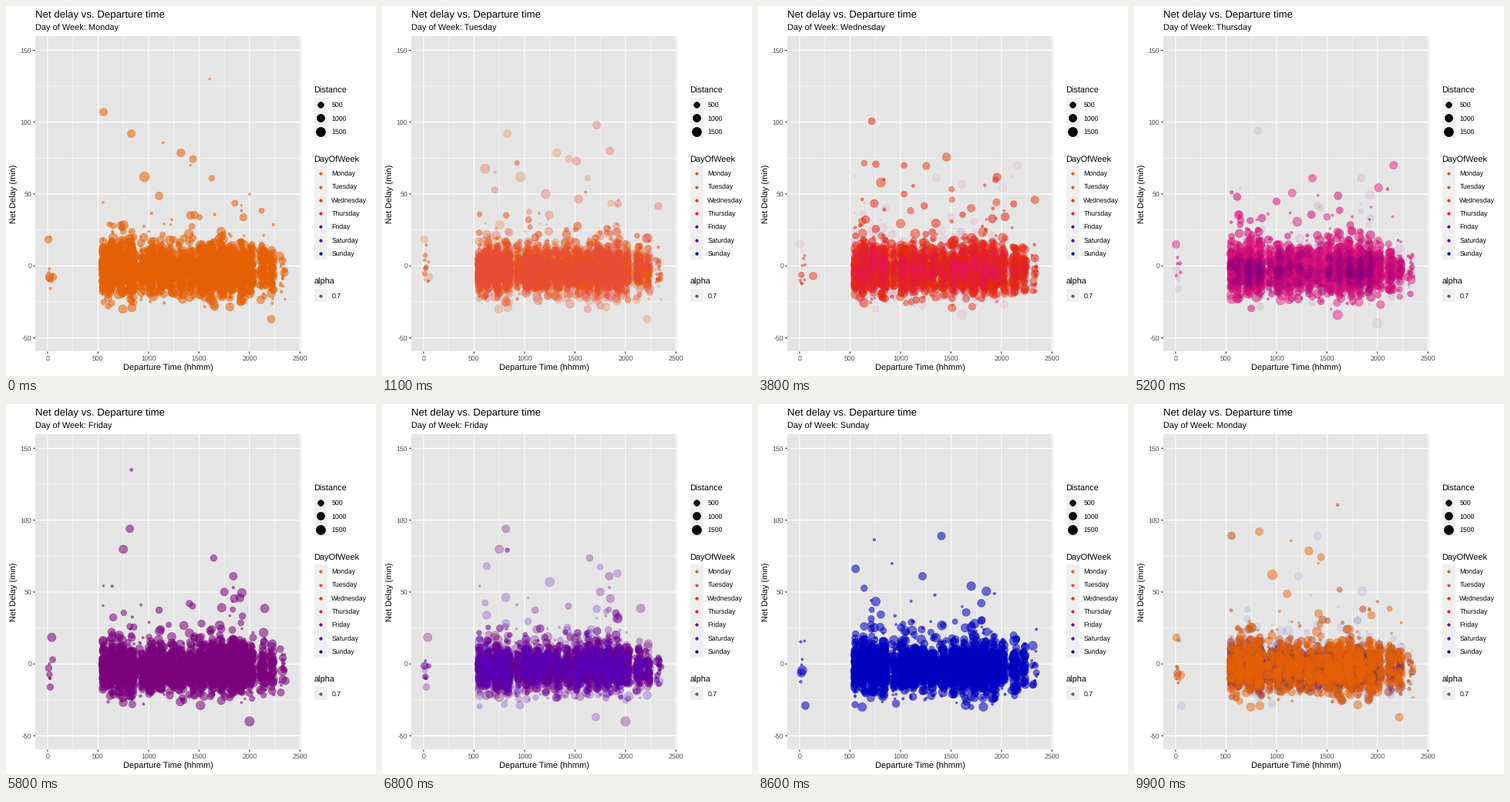
Recreate the animation shown at these times as a matplotlib script. Size 480 px wide and 480 px high, loop 10000 ms.

```python
import matplotlib.pyplot as plt
import numpy as np
from matplotlib.animation import FuncAnimation
from matplotlib.colors import to_rgb
from matplotlib.patches import Rectangle

plt.rcParams["font.family"] = "Liberation Sans"
plt.rcParams["text.hinting"] = "none"

DAYS = ["Monday", "Tuesday", "Wednesday", "Thursday", "Friday", "Saturday", "Sunday"]
HUES = ["#e66005", "#ea4c3a", "#e62d0a", "#e3147a", "#7a007c", "#5800bc", "#0000c0"]
RGB = np.array([to_rgb(c) for c in HUES])
LAST_HOLD = np.array([7, 22, 37, 51, 65, 79, 93])  # last still frame of each day
STEPS = 7
ALPHA = 0.55
EDGE = 0.6
FLIGHTS = 4800
BIG, TINY = 5.1, 1.4

rng = np.random.default_rng(11)


def px(t):
    return 53.9 + 0.131 * np.asarray(t)


def py(v):
    return 337.2 - 1.865 * np.asarray(v)


# --- flights ----------------------------------------------------------------
def departures(n):
    """Clock times as hhmm, from 5:50 to 23:59, plus a few after midnight."""
    hours = np.arange(5, 24)
    load = 6 + 2 * np.cos((hours - 18) / 5 * np.pi)
    load[hours == 5] = 3
    load[hours == 9] = 2.5
    load[hours > 19] = [2.6, 3.2, 1.6, 0.8]
    hour = rng.choice(hours, n, p=load / load.sum())
    first = np.select([hour == 5, hour == 9], [50, 10], 0)
    last = np.select([hour == 20, hour == 22], [40, 45], 60)
    minute = first + rng.random(n) * (last - first)
    t = hour * 100 + minute // 5 * 5
    t[:14] = rng.uniform(0, 60, 14)
    return t


def delays(shape):
    late = rng.random(shape) < 0.03
    tail = np.minimum(10 + rng.exponential(18, shape), 75)
    return rng.normal(-3, 8.4, shape).clip(-30, 24) + late * tail


def radii(t):
    shape = (7, len(t))
    small = np.where((t < 100) | (t > 2290), 0.75, np.where(t // 100 == 9, 0.6, 0.33))
    return np.where(rng.random(shape) < small,
                    rng.uniform(1.3, 1.9, shape), rng.uniform(3.5, 6.1, shape))


times = departures(FLIGHTS)
delay = delays((7, FLIGHTS))
size = radii(times)
flying = rng.random((7, FLIGHTS)) < 0.62

# the most striking flights of each day: time, delay, radius
STRIKING = [
    [(555, 107, BIG), (830, 92, BIG), (1605, 130, TINY), (960, 62, 6.5), (2215, -37, BIG)],
    [(925, 131, TINY), (1715, 98, BIG), (1845, 80, BIG), (1210, 50, 6)],
    [(715, 119, BIG), (805, 58, 6), (2330, 46, BIG), (135, -7, BIG)],
    [(5, 15, BIG), (2160, 70, BIG), (1355, 61, BIG), (1605, -34, 6.2)],
    [(815, 94, BIG), (830, 135, 2), (1840, 61, BIG), (2000, -40, 6.2)],
    [(1250, 57, 6), (1705, -37, BIG)],
    [(1405, 89, BIG), (1218, 61, BIG), (58, -29, BIG)],
]
slot = FLIGHTS
pad = sum(map(len, STRIKING))
times = np.append(times, np.zeros(pad))
delay, size = (np.hstack([m, m[:, :pad]]) for m in (delay, size))
flying = np.hstack([flying, np.zeros((7, pad), bool)])
for day, flights in enumerate(STRIKING):
    for t, v, r in flights:
        times[slot], delay[day, slot], size[day, slot] = t, v, r
        flying[day, slot] = True
        if v > 100:  # flown on the neighbouring days too
            flying[[day - 1, (day + 1) % 7], slot] = True
        slot += 1

x, y = px(times), py(delay)

# --- still parts ------------------------------------------------------------
fig = plt.figure(figsize=(480 / 72, 480 / 72), dpi=72, facecolor="white")
ax = fig.add_axes([0, 0, 1, 1])
ax.set(xlim=(0, 480), ylim=(480, 0))
ax.axis("off")

LEFT, RIGHT, TOP, BOTTOM = 38, 382.6, 39.3, 448.3
KEY_X, KEY = 399.5, 17.28


def box(x0, y0, w, h, color):
    ax.add_patch(Rectangle((x0, y0), w, h, fc=color, lw=0, zorder=0))


def line(xs, ys, color="white", lw=1.07):
    ax.plot(xs, ys, color=color, lw=lw, solid_capstyle="butt", snap=False, zorder=1)


def text(x0, y0, s, fs=8.8, color="black", ha="left", **kw):
    return ax.text(x0, y0, s, fontsize=fs, color=color, ha=ha, va="baseline", **kw)


def legend(title, top, labels, sizes, colors, alpha=1):
    text(KEY_X, top - 6, title, 11)
    for k, (label, r, color) in enumerate(zip(labels, sizes, colors)):
        mid = top + KEY * (k + 0.5)
        box(KEY_X, top + KEY * k, KEY, KEY, "#efefef")
        ax.scatter([KEY_X + KEY / 2 + 0.3], [mid + 0.3], s=(2 * r) ** 2, color=color,
                   alpha=alpha, lw=EDGE, zorder=3)
        text(422.3, mid + 3.3, label)


box(LEFT, TOP, RIGHT - LEFT, BOTTOM - TOP, "#e5e5e5")
for t in range(250, 2500, 500):
    line([px(t)] * 2, [TOP, BOTTOM], lw=0.53)
for v in range(-25, 150, 50):
    line([LEFT, RIGHT], [py(v)] * 2, lw=0.53)
for t in range(0, 2501, 500):
    line([px(t)] * 2, [TOP, BOTTOM])
    line([px(t)] * 2, [BOTTOM, BOTTOM + 2.75], "#333333")
    text(px(t), 460, str(t), color="#4d4d4d", ha="center")
for v in range(-50, 151, 50):
    line([LEFT, RIGHT], [py(v)] * 2)
    line([LEFT - 2.75, LEFT], [py(v)] * 2, "#333333")
    text(33.2, py(v) + 3.1, str(v), color="#4d4d4d", ha="right")

text(LEFT, 15, "Net delay vs. Departure time", 13.2)
subtitle = text(LEFT, 32, "", 11)
text((LEFT + RIGHT) / 2, 473, "Departure Time (hhmm)", 11, ha="center")
text(13.5, (TOP + BOTTOM) / 2, "Net Delay (min)", 11, ha="center",
     rotation=90, rotation_mode="anchor")

legend("Distance", 119.2, ["500", "1000", "1500"], [3.85, 5.1, 6.05], ["black"] * 3)
legend("DayOfWeek", 208.3, DAYS, [1.75] * 7, HUES)
legend("alpha", 367, ["0.7"], [1.75], ["black"], ALPHA)

# --- moving parts -----------------------------------------------------------
cloud = ax.scatter([0], [0], s=[1], marker=(20, 0, 0), lw=EDGE, zorder=2)
cloud.set_clip_path(Rectangle((LEFT, TOP), RIGHT - LEFT, BOTTOM - TOP, transform=ax.transData))


def phase(i):
    """Day index and share of the way to the next day."""
    k = int((LAST_HOLD <= i).sum()) - 1
    if k < 0:
        return 0, 0.0
    f = (i - LAST_HOLD[k]) / STEPS
    return ((k + 1) % 7, 0.0) if f >= 1 else (k, f)


def draw(i):
    a, f = phase(i)
    b = (a + 1) % 7
    if f == 0:
        groups = [(flying[a], 0, 1)]
    else:  # shared flights move, the others fade out or in
        groups = [(flying[a] & flying[b], f, 1),
                  (flying[a] & ~flying[b], 0, 1 - f),
                  (flying[b] & ~flying[a], 1, f)]
    spots, areas, colors = [], [], []
    for mask, g, fade in groups:
        yy = (1 - g) * y[a, mask] + g * y[b, mask]
        rr = (1 - g) * size[a, mask] + g * size[b, mask]
        rgba = [*((1 - g) * RGB[a] + g * RGB[b]), ALPHA * fade]
        spots.append(np.column_stack([x[mask], yy]))
        areas.append((2 * rr) ** 2)
        colors.append(np.tile(rgba, (len(yy), 1)))
    cloud.set_offsets(np.vstack(spots))
    cloud.set_sizes(np.concatenate(areas))
    cloud.set_facecolor(np.vstack(colors))
    cloud.set_edgecolor("face")
    subtitle.set_text("Day of Week: " + DAYS[b if f > 0.5 else a])
    return cloud, subtitle


anim = FuncAnimation(fig, draw, frames=100, interval=100, repeat=True, repeat_delay=0)
plt.show()
```
